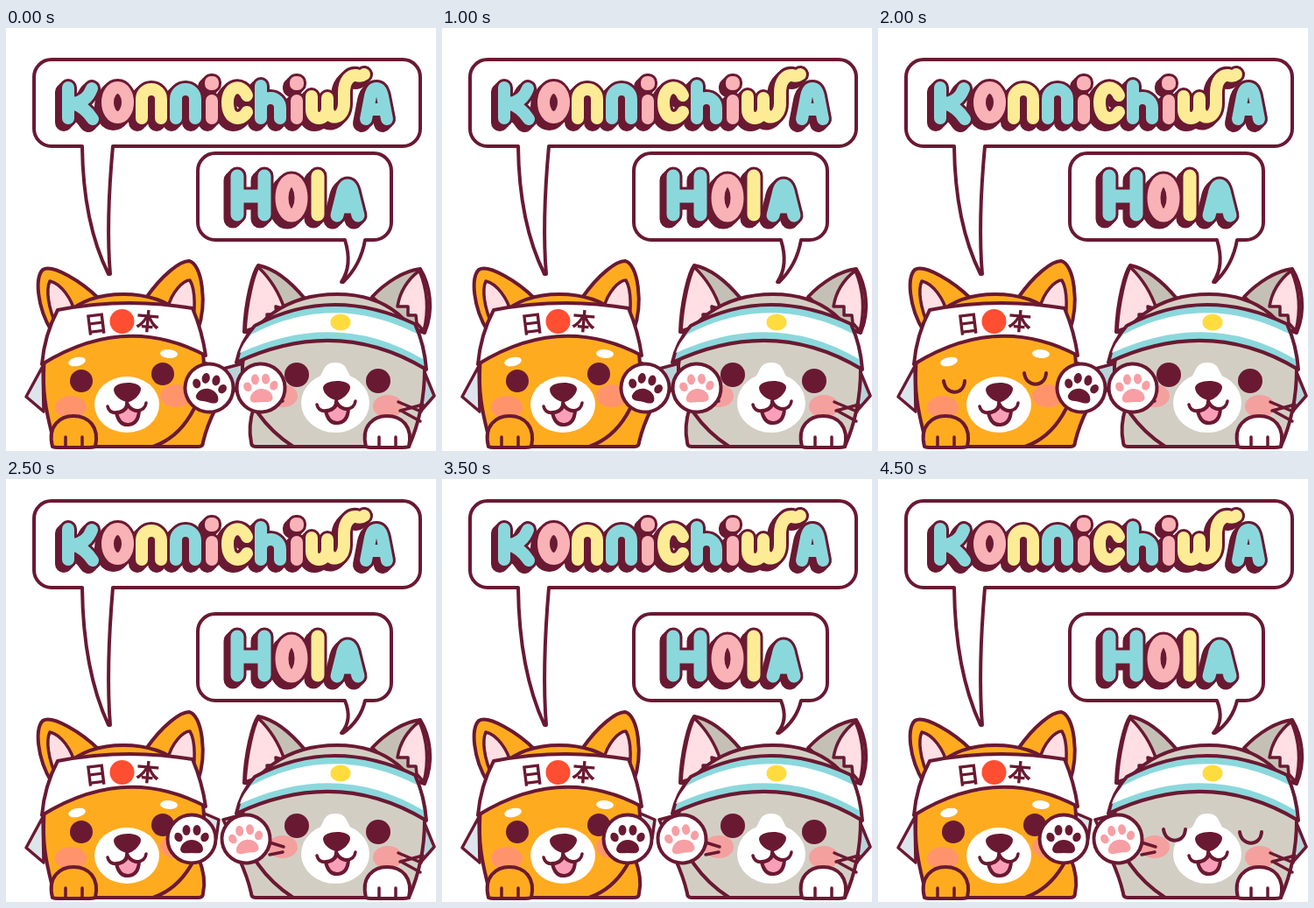
An HTML page that plays this animation: 491 px wide and 483 px high, repeating every 5000 ms.

```html
<!DOCTYPE html>
<html lang="en">
<head>
<meta charset="utf-8">
<title>Konnichiwa / Hola</title>
<style>
  html, body { margin: 0; width: 100%; height: 100%; overflow: hidden; background: #fff; }
  svg { display: block; width: 491px; height: 483px; }
  .line { stroke: #6a1932; stroke-width: 4; }
  .thin { stroke: #6a1932; stroke-width: 3.5; fill: none; }
  .dark { fill: #6a1932; }
  .kanji { font: bold 27px "Noto Sans CJK JP", "Noto Sans CJK", sans-serif; fill: #6a1932; text-anchor: middle; }
</style>
</head>
<body>
<svg viewBox="0 0 491 483" stroke-linecap="round" stroke-linejoin="round" role="img" aria-label="Konnichiwa, Hola">
  <defs>
    <g id="mouth">
      <path class="line" fill="#f9a0b8" d="M-12 25Q-9 40 2 39Q13 38 14 23Q7 24 1 17Q-3 25-12 25Z"/>
      <path class="thin" d="M-22 18Q-20 27-9 25Q0 23 0 13Q3 23 12 23Q21 22 22 14"/>
      <path class="dark" d="M-15-1C-15-11 15-12 16-2C16 5 6 13 1 13C-5 13-15 6-15-1Z"/>
    </g>
    <g id="footPaw">
      <path class="line" d="M-24 17C-30-7-15-18 0-18C17-18 30-6 25 17Q22 18 18 18H-18Q-22 18-24 17Z"/>
      <path class="thin" d="M-9 6V17M10 6V17"/>
    </g>
    <g id="pads">
      <path d="M-13 12C-12 5-6 1 0 1C6 1 13 5 13 12C12 18 5 16 0 16C-5 16-12 18-13 12Z"/>
      <ellipse cx="-15" cy="-2" rx="4.500" ry="5.500" transform="rotate(-25 -15 -2)"/>
      <ellipse cx="-6" cy="-10" rx="4.500" ry="6"/>
      <ellipse cx="6" cy="-10" rx="4.500" ry="6"/>
      <ellipse cx="15" cy="-2" rx="4.500" ry="5.500" transform="rotate(25 15 -2)"/>
    </g>
  </defs>

  <path id="bubble0" class="line" fill="#fff"/>
  <path id="bubble1" class="line" fill="#fff"/>
  <g id="word0"></g>
  <g id="word1"></g>

  <path class="thin" style="fill:#b9d3d9" d="M282 380L248 389L260 415ZM475 386L489 420L474 437Z"/>

  <g id="dog">
    <path class="thin" style="fill:#dce5ec" d="M42 386L23 421L43 438ZM222 380L243 389L240 410Z"/>
    <g class="line" fill="#ffab20">
      <path d="M52 346C35 318 33 285 42 276C53 269 87 290 106 309Z"/>
      <path d="M160 308C179 281 199 266 209 266C224 269 230 315 219 345Z"/>
    </g>
    <g class="thin">
      <path style="fill:#ffdfe3" d="M59 343C47 318 46 298 50 289C63 292 75 309 79 326Z"/>
      <path style="fill:#ffdfe3" d="M185 319C189 302 202 288 210 288C217 300 216 326 212 340Z"/>
    </g>
    <path id="dogArm" fill="#ffab20"/>
    <path class="line" fill="#ffab20" d="M56 478C49 450 42 425 43 395C43 335 80 304 134 304C188 304 225 335 226 385C226 425 205 465 168 478Z"/>
    <path id="dogArmLine" class="line" fill="none"/>
    <path class="line" fill="#fff" d="M59 322Q136 307 213 320Q224 346 228 374Q136 325 41 384Q44 350 59 322Z"/>
    <text class="kanji" transform="translate(104 347.500) rotate(-7)">日</text>
    <circle cx="132.500" cy="335" r="14" fill="#ff4e32"/>
    <text class="kanji" transform="translate(161 345) rotate(5)">本</text>
    <g fill="#fff">
      <ellipse cx="81" cy="381" rx="10" ry="5" transform="rotate(-12 81 381)"/>
      <ellipse cx="186" cy="372" rx="10" ry="5" transform="rotate(4 186 372)"/>
      <ellipse cx="138" cy="430" rx="37" ry="32"/>
    </g>
    <g fill="#ff946c">
      <ellipse cx="74" cy="433" rx="18" ry="13"/>
      <ellipse cx="194" cy="420" rx="18" ry="13"/>
    </g>
    <g id="dogOpen" class="dark"><circle cx="86" cy="403" r="13"/><circle cx="179" cy="395" r="13"/></g>
    <path id="dogShut" class="line" fill="none" d="M75 403C77 420 98 420 99 403M167 394C169 411 191 411 192 394"/>
    <use href="#mouth" x="138" y="414"/>
    <use href="#footPaw" x="77" y="461" fill="#ffab20"/>
    <g id="dogPaw">
      <circle class="line" r="27.500" fill="#fff"/>
      <use href="#pads" class="dark"/>
    </g>
  </g>

  <g id="cat">
    <g class="line" fill="#c5c0b5">
      <path d="M272 347C273 312 282 279 288 271C309 275 328 293 342 310L300 350Z"/>
      <path d="M418 307C434 290 455 277 473 275C484 293 489 322 478 348L455 340Z"/>
    </g>
    <g class="thin">
      <path style="fill:#ffdfe3" d="M273 346C275 312 283 282 288 273Q309 293 318 321L308 318L309 327L298 327L299 338L288 341Z"/>
      <path style="fill:#ffdfe3" d="M472 277Q486 310 477 346L469 337L468 328L459 328L459 318L447 318Q451 293 472 277Z"/>
    </g>
    <path id="catArm" fill="#d3cec4"/>
    <path class="line" fill="#d3cec4" d="M328 478C300 460 268 425 270 385C274 335 322 304 378 304C434 304 474 335 478 390C478 425 470 455 460 478Z"/>
    <path id="catArmLine" class="line" fill="none"/>
    <path class="line" fill="#8bd8dc" d="M284 340Q372 293 467 338Q478 362 480 390Q378 328 263 382Q268 358 284 340Z"/>
    <path fill="#fff" d="M280 350Q373 301 469 349Q474 362 476 378Q378 320 267 371Q270 360 280 350Z"/>
    <ellipse cx="382" cy="336" rx="11.500" ry="9.500" fill="#ffdc3d"/>
    <ellipse cx="376" cy="428" rx="39" ry="34" fill="#fff"/>
    <path fill="#fff" d="M354 404C364 394 361 382 376 382C391 382 388 394 398 404Z"/>
    <g fill="#f4a09f">
      <ellipse cx="316" cy="420" rx="17" ry="13"/>
      <ellipse cx="436" cy="432" rx="17" ry="13"/>
    </g>
    <path class="thin" d="M448 427L474 438M450 437L476 430M453 438L473 449M301 415L317 420M301 429L316 426"/>
    <g id="catOpen" class="dark"><circle cx="332" cy="396" r="14"/><circle cx="425" cy="403" r="14"/></g>
    <path id="catShut" class="line" fill="none" d="M326 400C328 417 350 417 351 400M413 403C415 420 437 420 438 403"/>
    <use href="#mouth" x="377" y="412"/>
    <use href="#footPaw" x="435" y="461" fill="#fff"/>
    <g id="catPaw">
      <circle class="line" r="27.500" fill="#fff"/>
      <use href="#pads" fill="#f79fa4"/>
    </g>
  </g>
</svg>
<script>
const INK = '#6a1932', TEAL = '#8bd8dc', PINK = '#f9b2b6', YELLOW = '#fdec95';
const el = id => document.getElementById(id);
const set = (id, name, value) => el(id).setAttribute(name, value);

// Lettering is built from the centre lines of thick round strokes.
const arch = x => `M${x} 103V81a11 11 0 0 1 22 0V103`;
const dotted = x => `M${x} 83V103M${x - 1} 62h2v2h-2Z`;
const oval = (x, y, rx, ry) => `M${x - rx} ${y}a${rx} ${ry} 0 0 1 ${2 * rx} 0a${rx} ${ry} 0 0 1 ${-2 * rx} 0Z`;
const words = [
  { width: 14, letters: [
    [TEAL, 'M71 68V103M98 69Q92 85 76 86Q90 90 99 104'],
    [PINK, oval(127.5, 85, 11.5, 17)],
    [YELLOW, arch(155)],
    [TEAL, arch(194)],
    [PINK, dotted(235)],
    [YELLOW, 'M275 77C269 63 253 66 253 85C253 106 269 107 275 96'],
    [TEAL, 'M291 66V103M291 91a11 11 0 0 1 22 0V103'],
    [PINK, dotted(332)],
    [YELLOW, 'M349 78V93C349 107 366 106 367 92V80V92C368 106 386 105 386 86V74C386 60 393 53 400 54Q405 56 409 53'],
    [TEAL, 'M411 104L416 78Q418 69 423 69Q428 69 430 78L435 104M414 93H432']
  ] },
  { width: 15, letters: [
    [TEAL, 'M264 169V213M295 169V213M264 192H295'],
    [PINK, oval(326, 194, 11, 20)],
    [YELLOW, 'M356 169V213'],
    [TEAL, 'M378 214L384 190Q386 180 390 180Q394 180 396 190L402 214M381 204H399']
  ] }
];

words.forEach(({ width, letters }, i) => {
  const stroke = (color, d, w) => `<path d="${d}" stroke="${color}" stroke-width="${w}"/>`;
  const outline = letters.map(([, d]) => stroke(INK, d, width + 6)).join('');
  const faces = letters.map(([color, d]) => stroke(color, d, width)).join('');
  el('word' + i).innerHTML = `<g fill="none"><g id="outline${i}">${outline}</g>
    <use href="#outline${i}" x="-2.5" y="2.5"/><use href="#outline${i}" x="-5" y="5"/>${faces}</g>`;
});

function bubble(id, [left, right, top], [tailLeft, tailRight], [tipX, tipY], [bendLeft, bendRight]) {
  const r = 20, bottom = top + 99, bendY = bottom + (tipY - bottom) * .6;
  const corner = (dx, dy) => `a${r} ${r} 0 0 1 ${dx * r} ${dy * r}`;
  set(id, 'd', `M${left + r} ${top}H${right - r}${corner(1, 1)}V${bottom - r}${corner(-1, 1)}
    H${tailRight}Q${bendRight} ${bendY} ${tipX + 1} ${tipY}H${tipX - 1}
    Q${bendLeft} ${bendY} ${tailLeft} ${bottom}
    H${left + r}${corner(-1, -1)}V${top + r}${corner(1, -1)}Z`);
}

// side is 1 for a foreleg on the right of its body, -1 for the left.
function raisePaw(name, x, side, foot, chest, tilt) {
  const y = 411;
  const edge = `M${x + side * 8} ${y + 22}Q${foot + side * 4} 455 ${foot} 473Q${foot} 478 ${foot - side * 5} 478H${chest}`;
  set(name + 'Arm', 'd', `${edge}L${x - side * 22} ${y + 10}Z`);
  set(name + 'ArmLine', 'd', edge);
  set(name + 'Paw', 'transform', `translate(${x} ${y}) rotate(${tilt})`);
}

function blink(name, shut) {
  set(name + 'Open', 'visibility', shut ? 'hidden' : 'visible');
  set(name + 'Shut', 'visibility', shut ? 'visible' : 'hidden');
}

function draw() {
  const step = Math.floor(performance.now() % 5000 / 500);
  const swung = step % 2;
  const shift = swung * 11;
  bubble('bubble0', [32, 473, 36 - shift], [87, 122], [118, 281], [88, 114]);
  bubble('bubble1', [219, 440, 143 + shift], [387, 410], [384, 290], [396, 405]);
  set('word0', 'transform', `translate(0 ${-shift})`);
  set('word1', 'transform', `translate(0 ${shift})`);
  raisePaw('dog', swung ? 212 : 232, 1, 225, 168, swung ? 0 : 12);
  raisePaw('cat', swung ? 274 : 291, -1, 280, 328, swung ? -8 : -3);
  blink('dog', step === 4);
  blink('cat', step === 9);
  requestAnimationFrame(draw);
}
draw();
</script>
</body>
</html>
```
